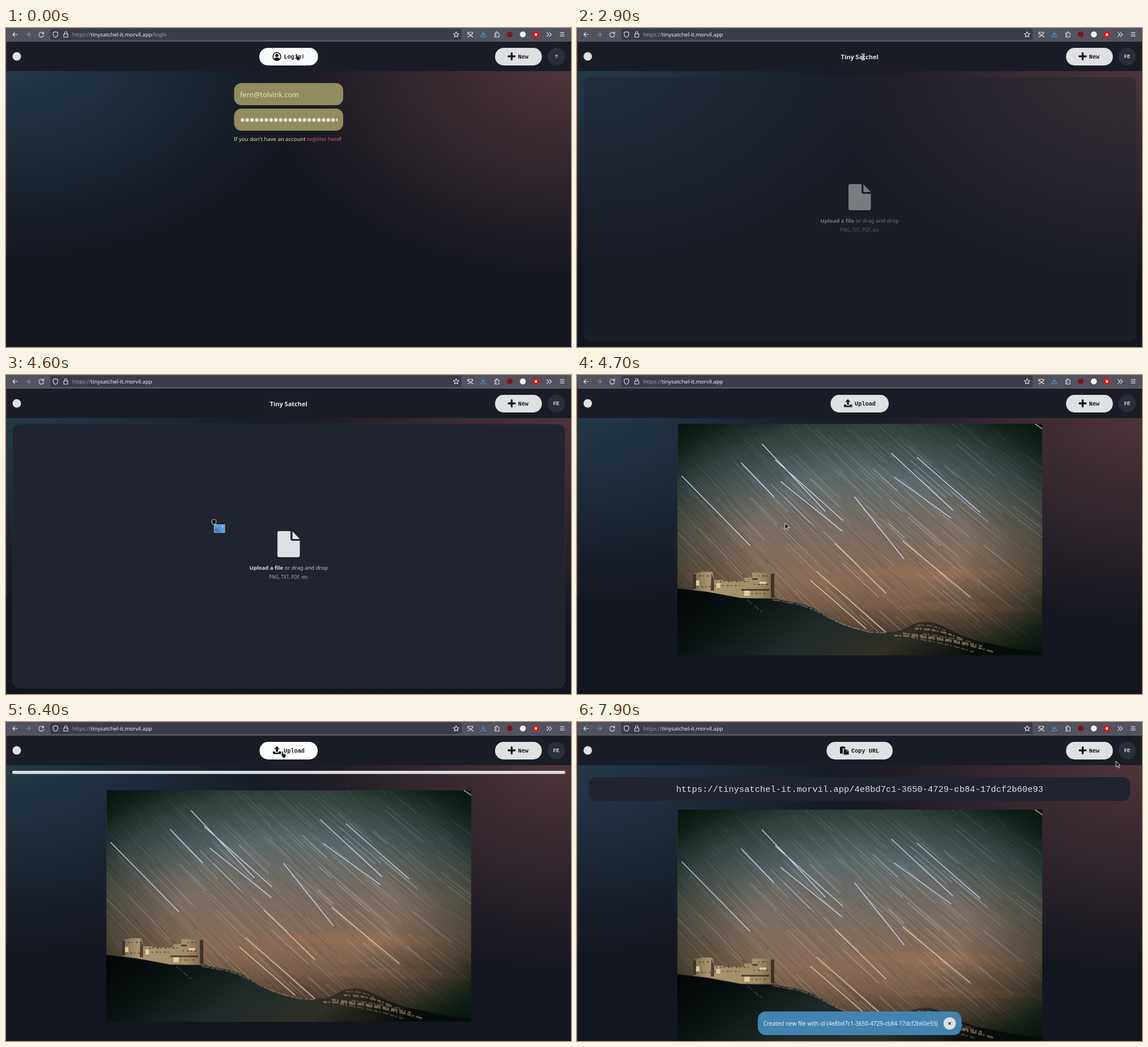
Recreate the animation shown at these times as an HTML page. Size 997 by 562 pixels, loop 8 s.

```html
<!DOCTYPE html>
<html lang="en">
<head>
<meta charset="utf-8">
<title>File upload demo</title>
<style>
html, body { margin: 0; width: 100%; height: 100%; overflow: hidden; background: #14161f; }
svg { display: block; width: 997px; height: 562px; }
text { font-family: "Noto Sans", "Open Sans", sans-serif; font-size: 9.54px; }
.mono { font-family: "Liberation Mono", "DejaVu Sans Mono", monospace; font-size: 15.43px; }
.label { font-family: "Liberation Mono", "DejaVu Sans Mono", monospace; font-size: 10.28px; font-weight: 700; fill: #14161f; }
.avatar { font-family: "Liberation Sans", Arial, sans-serif; font-size: 8.5px; font-weight: 700; fill: #dfe0e4; }
.mid { text-anchor: middle; }
.line { fill: none; stroke: #dddde2; stroke-width: 1.15; stroke-linecap: round; stroke-linejoin: round; }
.cursor path { fill: #111; stroke: #fff; stroke-width: .8; stroke-linejoin: round; }

/* hard scene changes */
.step { animation: 8s step-end infinite; }
.login { animation-name: login; }
.session { animation-name: session; }
.drop { animation-name: drop; }
.preview { animation-name: preview; }
.media { animation-name: media; }
.sending { animation-name: sending; }
.done { animation-name: done; }
.idle { animation-name: idle; }
.busy { animation-name: busy; }
.hand { animation-name: hand; }
.beam { animation-name: beam; }
.arrow { animation-name: arrow; }
.drag { animation-name: drag; }
@keyframes login { 0% { visibility: visible } 36.25%, 100% { visibility: hidden } }
@keyframes session { 0% { visibility: hidden } 36.25%, 100% { visibility: visible } }
@keyframes drop { 0% { visibility: hidden } 36.25% { visibility: visible } 58.75%, 100% { visibility: hidden } }
@keyframes preview { 0% { visibility: hidden } 58.75% { visibility: visible } 82.5%, 100% { visibility: hidden } }
@keyframes media {
  0% { visibility: hidden; transform: none }
  58.75% { visibility: visible; transform: none }
  73.75% { visibility: visible; transform: translateY(34.3px) }
  82.5%, 100% { visibility: visible; transform: translateY(68.4px) }
}
@keyframes sending { 0% { visibility: hidden } 73.75% { visibility: visible } 82.5%, 100% { visibility: hidden } }
@keyframes done { 0% { visibility: hidden } 82.5%, 100% { visibility: visible } }
@keyframes idle { 0% { visibility: visible } 10.1875%, 100% { visibility: hidden } }
@keyframes busy { 0% { visibility: hidden } 10.1875% { visibility: visible } 36.25%, 100% { visibility: hidden } }
@keyframes hand { 0% { visibility: visible } 36.25% { visibility: hidden } 70% { visibility: visible } 90%, 100% { visibility: hidden } }
@keyframes beam { 0% { visibility: hidden } 36.25% { visibility: visible } 42.5%, 100% { visibility: hidden } }
@keyframes arrow {
  0% { visibility: hidden } 42.5% { visibility: visible } 52.5% { visibility: hidden }
  58.75% { visibility: visible } 70% { visibility: hidden } 90%, 100% { visibility: visible }
}
@keyframes drag { 0% { visibility: hidden } 52.5% { visibility: visible } 58.75%, 100% { visibility: hidden } }

/* smooth motion */
.flow { animation: 8s linear infinite; }
.press { animation-name: press; transform-origin: 498.8px 50.3px; }
.press2 { animation-name: press2; transform-origin: 498.8px 50.3px; }
.glow { animation-name: glow; fill: #fff; }
.hover { animation-name: hover; fill: #fff; }
.leave { animation-name: leave; fill: #fff; }
.fade { animation-name: fade; }
.fill { animation-name: fill; transform-origin: 11px 89px; }
.toast { animation-name: toast; }
.cursor { animation-name: path; }
.spin { animation: spin 1s steps(8) -185ms infinite; transform-origin: 478px 50.3px; }
@keyframes press { 0%, 7.5% { transform: none } 8.75% { transform: scale(.97) } 11.25% { transform: scale(1.015) } 15%, 100% { transform: none } }
@keyframes press2 { 0%, 71.25% { transform: none } 72.5% { transform: scale(.988) } 75% { transform: scale(1.01) } 76.25%, 100% { transform: none } }
@keyframes glow { 0% { fill: #fafbfd } 1.25%, 7.5% { fill: #fff } 8.75% { fill: #e9eaec } 15%, 100% { fill: #fff } }
@keyframes hover { 0%, 70% { fill: #dfe0e2 } 72.5% { fill: #fafbff } 75%, 100% { fill: #fff } }
@keyframes leave { 0%, 88.75% { fill: #fff } 92.5%, 100% { fill: #dfe0e2 } }
@keyframes fade { 0%, 36.24% { opacity: 0 } 36.25% { opacity: .5 } 38.75%, 100% { opacity: 1 } }
@keyframes fill { 0%, 73.75% { transform: scaleX(.04) } 78.75%, 100% { transform: none } }
@keyframes toast { 0%, 81.25% { transform: translateY(60px) } 85%, 100% { transform: none } }
@keyframes spin { to { transform: rotate(360deg) } }
@keyframes path {
  0%, 3.75% { transform: translate(513px, 45.5px) }
  6.25%, 36.24% { transform: translate(508px, 51px) }
  36.25%, 41.25% { transform: translate(505px, 51px) }
  42.5% { transform: translate(540px, 130px) }
  46.25% { transform: translate(740px, 580px) }
  51.25% { transform: translate(250px, 580px) }
  52.5% { transform: translate(262px, 540px) }
  57.5% { transform: translate(367px, 258px) }
  58.75%, 61.24% { transform: translate(367px, 261px) }
  61.25%, 65% { transform: translate(452px, 346px) }
  66.25% { transform: translate(458px, 300px) }
  70%, 72.5% { transform: translate(487px, 51px) }
  80%, 88.75% { transform: translate(488px, 51.5px) }
  90% { transform: translate(520px, 62px) }
  93.75% { transform: translate(760px, 122px) }
  96.25% { transform: translate(985px, 134px) }
  98.75%, 100% { transform: translate(951px, 69px) }
}
</style>
</head>
<body>
<svg viewBox="0 0 997 562">
  <defs>
    <radialGradient id="blue" gradientUnits="userSpaceOnUse" cx="0" cy="0" r="1" gradientTransform="translate(0 50) scale(560 360)">
      <stop stop-color="#243b4c"/><stop offset="1" stop-color="#243b4c" stop-opacity="0"/>
    </radialGradient>
    <radialGradient id="red" gradientUnits="userSpaceOnUse" cx="0" cy="0" r="1" gradientTransform="translate(997 50) scale(560 390)">
      <stop stop-color="#50373c"/><stop offset="1" stop-color="#50373c" stop-opacity="0"/>
    </radialGradient>
    <linearGradient id="sky" x2="0" y2="1">
      <stop stop-color="#4d5c57"/><stop offset=".22" stop-color="#5b686b"/><stop offset=".45" stop-color="#786d63"/>
      <stop offset=".68" stop-color="#896a54"/><stop offset=".85" stop-color="#705441"/><stop offset="1" stop-color="#4a3a30"/>
    </linearGradient>
    <radialGradient id="vignette" cx=".5" cy=".5" r=".72">
      <stop offset=".4" stop-color="#03140d" stop-opacity="0"/><stop offset=".7" stop-color="#03140d" stop-opacity=".42"/>
      <stop offset=".88" stop-color="#03140d" stop-opacity=".85"/><stop offset="1" stop-color="#03140d"/>
    </radialGradient>
    <linearGradient id="hill" x2="1" y2=".25">
      <stop stop-color="#020605"/><stop offset=".25" stop-color="#0b1413"/><stop offset=".5" stop-color="#202b2a"/>
      <stop offset=".75" stop-color="#302e26"/><stop offset="1" stop-color="#070d0a"/>
    </linearGradient>
    <linearGradient id="stone" x2="1"><stop stop-color="#7d6a4e"/><stop offset=".2" stop-color="#ab9470"/><stop offset=".8" stop-color="#a48c68"/><stop offset="1" stop-color="#79654a"/></linearGradient>
    <clipPath id="frame"><rect x="177.5" y="86" width="643.5" height="407.5"/></clipPath>
    <clipPath id="field"><rect x="413" y="150" width="171.8" height="24"/></clipPath>
  </defs>

  <rect width="997" height="562" fill="#14161f"/>
  <rect width="997" height="562" fill="url(#blue)"/>
  <rect width="997" height="562" fill="url(#red)"/>

  <!-- sign-in form -->
  <g class="step login">
    <rect x="402.5" y="97" width="192.5" height="39" rx="13" fill="#908c5f"/>
    <rect x="402.5" y="142" width="192.5" height="39" rx="13" fill="#908c5f"/>
    <text x="413" y="122" style="font-size:12.55px" fill="#e2e0d2">fern@tolvink.com</text>
    <path d="M417.3 162H592" clip-path="url(#field)" stroke="#e6e5da" stroke-width="6.4" stroke-linecap="round" stroke-dasharray="0 8.42"/>
    <text x="402" y="198.5" fill="#eee3a2">If you don't have an account <tspan fill="#c4587c">register here</tspan>!</text>
  </g>

  <!-- drop zone -->
  <g class="step drop"><g class="flow fade">
    <rect x="11.5" y="86.5" width="975" height="465" rx="13" fill="#20242f" stroke="#303645" stroke-dasharray="4 3"/>
    <path fill="#dfe0e3" d="M479 278q0-3 3-3h20v14q0 3 3 3h13.5v26q0 3-3 3h-33.5q-3 0-3-3zM505.5 275.5l13 13.5h-13z"/>
    <text x="498.7" y="343" class="mid" fill="#c9cbd0"><tspan font-weight="700" fill="#dcdde1">Upload a file</tspan> or drag and drop</text>
    <text x="498.7" y="358.5" class="mid" style="font-size:8.1px" fill="#a0a3ac">PNG, TXT, PDF, etc</text>
  </g></g>

  <!-- night picture -->
  <g class="step media"><g clip-path="url(#frame)">
    <rect x="177.5" y="86" width="643.5" height="407.5" fill="url(#sky)"/>
    <path d="M470 345Q620 325 800 350Q640 372 470 345M560 410Q680 385 820 415Q690 425 560 410" fill="#b0704f" opacity=".25"/>
    <g id="trails" fill="none" stroke-linecap="round"></g>
    <rect x="177.5" y="86" width="643.5" height="407.5" fill="url(#vignette)"/>
    <g fill="none" stroke-linecap="round" stroke-width="1.3">
      <path stroke="#d0dcff" d="M600 145L711 242M327 122L438 240M350 150L469 256M555 138L663 238M185 178L305 300M290 155L347 214M560 180L660 252M360 188L468 275M490 215L577 324"/>
      <path stroke="#e6d2b2" d="M575 293L694 391M455 297L545 384M423 346L545 453M412 362L510 447M808 86L821 95"/>
      <path stroke="#8a6c45" d="M178 278L262 362"/>
    </g>
    <path fill="url(#stone)" d="M205 351q10-6 34-4l3 14h16v2h37v-6h14v-9l39 1v43l-60 4-83-16z"/>
    <path fill="#1d1812" opacity=".65" d="M237 349l5 12v19h-6zM290 377h49v3h-49zM309 358h10v3h-10zM342 350h6v42h-6zM205 351h5v26h-5z"/>
    <path fill="none" stroke="#2c241a" stroke-width="2" stroke-dasharray="2 5 4 3" opacity=".55" d="M208 354h28M212 373h24M245 364h62M243 371h45M320 354h20M312 369h28M294 385h42"/>
    <path fill="#f6e3b4" opacity=".75" d="M210 362h6v9h-6zM246 367h7v8h-7zM295 380h10v9h-10zM322 364h12v4h-12z"/>
    <path fill="url(#hill)" d="M177 376L230 382 290 393 345 394 390 402C430 412 440 428 470 440S525 455 555 453 585 435 615 435 670 461 710 469 775 484 821 488V494H177Z"/>
    <path fill="none" stroke="#8c8b80" stroke-width="1.6" stroke-dasharray="14 3 6 2" opacity=".7" d="M345 396L390 404C430 415 445 432 480 443S525 455 545 454"/>
    <g fill="none" stroke="#b89d74" stroke-dasharray="7 2 3 4 11 3">
      <path stroke-width="3" opacity=".55" d="M560 459Q640 460 735 488M575 455Q650 464 715 478M596 447Q640 447 680 466"/>
      <path stroke-width="2" opacity=".4" d="M590 463Q650 472 700 488M600 441Q625 438 650 451M610 456Q660 463 700 471"/>
      <path opacity=".6" d="M300 396L327 418"/>
    </g>
  </g></g>

  <rect class="step sending" x="11" y="86" width="976" height="5.5" rx="2.7" fill="#323744"/>
  <g class="step sending"><rect class="flow fill" x="11" y="86" width="976" height="5.5" rx="2.7" fill="#dcdde0"/></g>

  <!-- shared link -->
  <g class="step done">
    <rect x="21" y="97" width="955" height="42" rx="13" fill="#20242f"/>
    <text x="498.8" y="122.5" class="mono mid" fill="#dfe1e6">https://tinysatchel-it.morvil.app/4e8bd7c1-3650-4729-cb84-17dcf2b60e93</text>
  </g>
  <g class="step done"><g class="flow toast">
    <rect x="319" y="510" width="359.5" height="41.5" rx="14" fill="#4383b0"/>
    <text x="329" y="534.5" style="font-size:9.9px" fill="#eef3f8">Created new file with id (4e8bd7c1-3650-4729-cb84-17dcf2b60e93)</text>
    <circle cx="657.5" cy="531" r="10.8" fill="#dfe0e2"/>
    <path d="M655.5 529l4 4m0-4l-4 4" stroke="#22252e" stroke-width="1.4"/>
  </g></g>

  <!-- page header -->
  <rect y="24" width="997" height="52" fill="#1a1d26"/>
  <circle cx="19" cy="50" r="7.5" fill="#dfe0e2"/>
  <rect x="863" y="35" width="82.5" height="31" rx="15" fill="#dfe0e2"/>
  <path d="M892.3 44.5v11m-5.5-5.5h11" stroke="#14161f" stroke-width="3.3" stroke-linecap="round"/>
  <text x="903.5" y="53.5" class="label">New</text>
  <circle cx="971" cy="50.3" r="15.5" fill="#2a2e3c"/>
  <text x="971" y="53.3" class="avatar mid step login">?</text>
  <text x="971" y="53.3" class="avatar mid step session">FE</text>

  <g class="step login"><g class="flow press">
    <rect class="flow glow" x="447" y="35" width="103.5" height="31" rx="15"/>
    <text x="490.3" y="53.5" class="label">Login!</text>
    <g class="step idle">
      <circle cx="478" cy="50.3" r="7" fill="none" stroke="#14161f" stroke-width="1.5"/>
      <circle cx="478" cy="48.3" r="2.8" fill="#14161f"/>
      <path d="M472.8 54.5q1.2-2.5 3.7-2.5h3q2.5 0 3.7 2.5q-2 2.6-5.2 2.6t-5.2-2.6" fill="#14161f"/>
    </g>
    <g class="step busy"><g class="spin" id="dots" fill="#14161f"></g></g>
  </g></g>

  <text x="498.7" y="54.5" class="mid step drop" style="font-size:11px;font-weight:600" fill="#e4e5e8">Tiny Satchel</text>

  <g class="step preview"><g class="flow press2">
    <rect class="flow hover" x="447.5" y="35" width="102.5" height="31" rx="15"/>
    <path fill="#14161f" d="M478 42.5l4.8 5h-3v5h-3.6v-5h-3zM471 52h4v2h6v-2h4.5v4.5h-14.5z"/>
    <text x="490" y="53.5" class="label">Upload</text>
  </g></g>

  <g class="step done">
    <rect class="flow leave" x="440.5" y="35" width="116.5" height="31" rx="15"/>
    <path fill="#14161f" d="M464 44.5q0-1 1-1h2q1.5-2 3 0h2.5q1 0 1 1v2.3h-4.5v9h-4q-1 0-1-1zM470.5 48h5v3.5h4v6h-9zM476.5 48l3 2.7h-3z"/>
    <text x="484" y="53.5" class="label">Copy URL</text>
  </g>

  <!-- browser bar -->
  <rect width="997" height="24" fill="#51535e"/>
  <rect y="23" width="997" height="1" fill="#5b5d68"/>
  <rect x="78" y="1" width="726" height="20" rx="2.5" fill="#3a3c48"/>
  <text x="117" y="15" fill="#a0a1aa">https://<tspan fill="#f1f1f4">tinysatchel-it.morvil.app</tspan><tspan class="step login">/login</tspan></text>
  <g class="line">
    <path d="M20 11.5h-8m3.5-3.5l-3.5 3.5 3.5 3.5"/>
    <path d="M35 11.5h8m-3.5-3.5l3.5 3.5-3.5 3.5" opacity=".4"/>
    <path d="M65.8 9.3a4.3 4.3 0 1 0 .7 3.2M66.5 6.8v3h-3"/>
    <path d="M87.3 6.5l4 1.4v3q0 4-4 5.6-4-1.6-4-5.6v-3z"/>
    <path d="M102 10.5h7v5.5h-7zM103.5 10v-1.5a2 2 0 0 1 4 0v1.5"/>
    <path d="M794.3 6.5l1.4 3.2 3.5.3-2.6 2.3.8 3.5-3.1-1.9-3.1 1.9.8-3.5-2.6-2.3 3.5-.3z"/>
    <path d="M815 7.5h8.5v3M815 7.5v4M816 15.5l7.5-6M816 9.5l7.5 6M814.8 15.5h2m5.5 0h2"/>
    <path d="M842.3 6.5v6m-2.7-2.7l2.7 2.7 2.7-2.7M838 13v2.5h8.6v-2.5" stroke="#4a98e8"/>
    <path d="M862.5 9h2.5q-.8-2.5 1-2.5t1 2.5h3v7h-7.5v-2.3q2.5.6 2.5-1.2t-2.5-1.2z"/>
    <path d="M954.5 8l3.5 3.5-3.5 3.5m4.5-7l3.5 3.5-3.5 3.5"/>
    <path d="M978 8.3h7m-7 2.9h7m-7 2.9h7"/>
  </g>
  <circle cx="889" cy="11.3" r="5" fill="#80101c"/>
  <circle cx="912" cy="11.3" r="5.2" fill="#f2f2f4"/>
  <rect x="930" y="6.5" width="10" height="10" rx="1" fill="#f00c0c"/>
  <rect x="933" y="9.5" width="4" height="4" fill="#fff"/>
  <rect width="1" height="390" fill="#5f3c50"/>
  <rect y="390" width="1" height="172" fill="#2a2a36"/>

  <g class="flow cursor">
    <path class="step hand" d="M-1.3 1.2a1.3 1.3 0 0 1 2.6 0v3l3.7.8q1.4.4 1.2 2l-.8 3v1.5h-5.4v-1.5l-3-3.7q-.3-1.5 1.7-.2z"/>
    <path class="step beam" d="M-2.3-5.5h1.8l.5.5.5-.5h1.8v1.2h-1.6v8.6h1.6v1.2h-1.8l-.5-.5-.5.5h-1.8v-1.2h1.6v-8.6h-1.6z"/>
    <path class="step arrow" d="M0 0v10.5l2.5-2.3 1.8 4 1.8-.8-1.8-3.9h3.3z"/>
    <g class="step drag">
      <rect x=".5" y="5.5" width="18.5" height="14" fill="#599bd7" stroke="#8fbbe3"/>
      <path d="M1 11q8 0 12 8h-12z" style="fill:#4280bb;stroke:none"/>
      <circle cx="15" cy="9" r="1.3" fill="#d5e8fa"/>
      <path d="M-3.5 1.5l-1.2-1.2q0-1.3 1.5-1v-2.4q.8-1 1.8 0 1-.9 1.9 0 1-.7 1.8.2 1.4-.2 1.4 1v3.900l-1 3h-4.700z"/>
    </g>
  </g>
</svg>
<script>
const NS = "http://www.w3.org/2000/svg";
function add(parent, tag, attrs) {
  const el = document.createElementNS(NS, tag);
  for (const key in attrs) el.setAttribute(key, attrs[key]);
  document.getElementById(parent).append(el);
}

// seven dots, one of eight places left empty
for (let i = 0; i < 7; i++) {
  const a = i * Math.PI / 4;
  add("dots", "circle", { cx: 478 + 6.3 * Math.cos(a), cy: 50.3 + 6.3 * Math.sin(a), r: 1.4 });
}

let seed = 41;
const rand = () => (seed = seed * 16807 % 2147483647) / 2147483647;

function trails(count, length, attrs) {
  let d = "";
  for (let i = 0; i < count; i++) {
    const x = 130 + rand() * 690, y = 60 + rand() * 370;
    const run = length * (.35 + rand());
    const slope = 1.08 - (x - 178) / 643 * .33;
    d += `M${x.toFixed(1)} ${y.toFixed(1)}l${run.toFixed(1)} ${(run * slope).toFixed(1)}`;
  }
  add("trails", "path", { d, ...attrs });
}
trails(200, 80, { stroke: "#1f2a26", "stroke-width": .8, opacity: .3 });
trails(340, 80, { stroke: "#c4bfae", "stroke-width": .5, opacity: .42 });
trails(100, 75, { stroke: "#ded6c4", "stroke-width": .7, opacity: .6 });
trails(30, 60, { stroke: "#cfdaf5", "stroke-width": .9, opacity: .8 });
</script>
</body>
</html>
```
